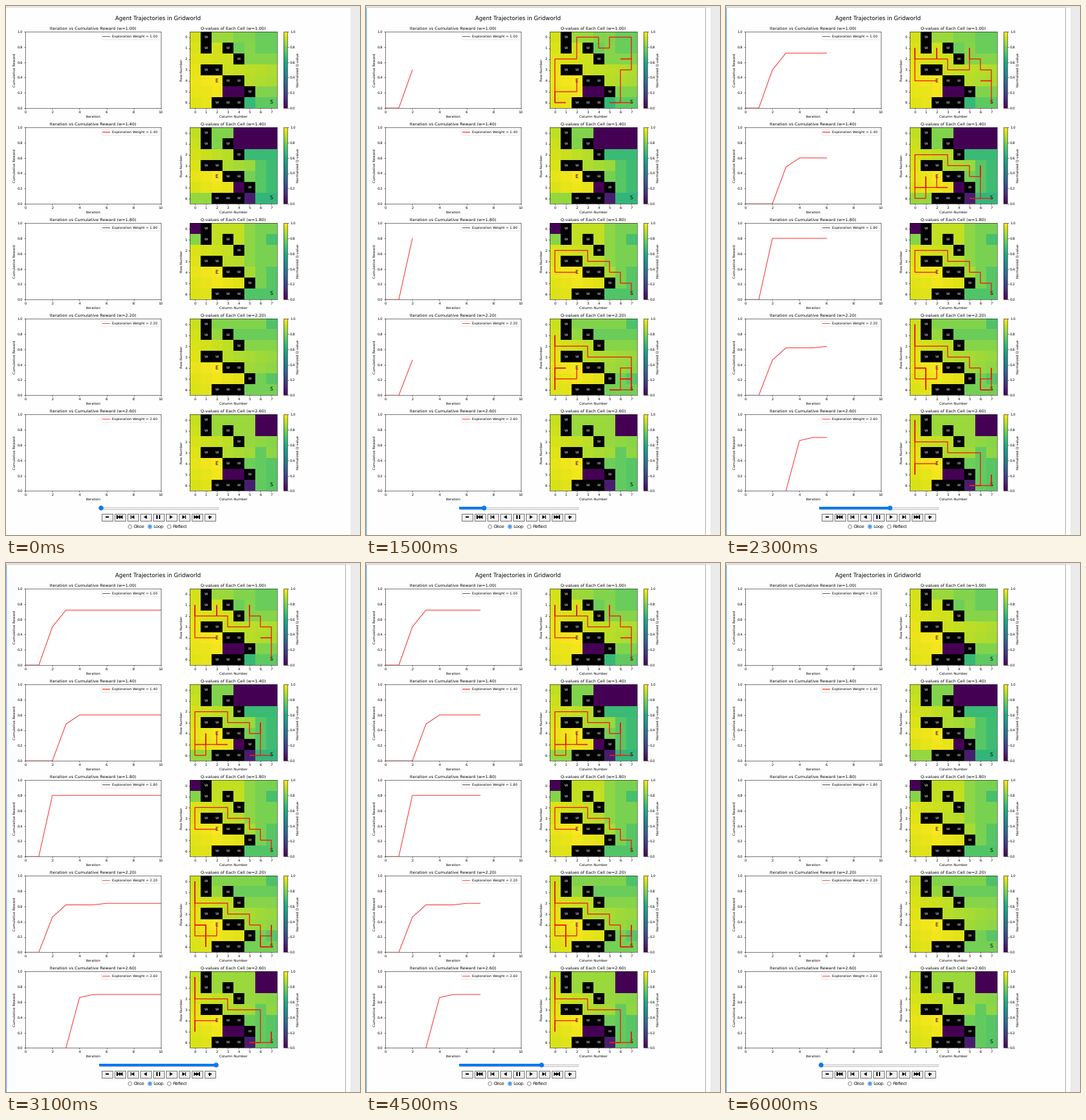
Animation, 551 px wide and 824 px high, one loop 7.5 s. Source, as a matplotlib script:

```python
import numpy as np
import matplotlib.pyplot as plt
from matplotlib.animation import FuncAnimation
from matplotlib.patches import Circle, Polygon, Rectangle

W, H, DPI = 551, 824, 64
PX = 72 / DPI              # points per pixel
U = 0.54 * PX              # shrinks matplotlib's default sizes to the page zoom
STEP_MS, LOOP_MS = 100, 7500
PAPER, RED, TRAIL_RED, BLUE = "#fefefe", "#fa1414", "#ee1c10", "#0b79f0"

plt.rcParams["font.family"] = "DejaVu Sans"
plt.rcParams["text.hinting"] = "none"
for key in ("font.size", "axes.titlepad", "axes.labelpad", "patch.linewidth",
            *(f"{a}tick.major.{k}" for a in "xy" for k in ("size", "pad"))):
    plt.rcParams[key] *= U
for key in ("axes.linewidth", "xtick.major.width", "ytick.major.width"):
    plt.rcParams[key] = 0.6

ROWS, COLS = 7, 8
EXIT, START = (4, 2), (6, 7)
WALLS = [(0, 1), (1, 1), (1, 3), (2, 4), (3, 1), (3, 2),
         (4, 3), (4, 4), (5, 5), (6, 2), (6, 3), (6, 4)]
MOVES = {"U": (0, -1), "D": (0, 1), "L": (-1, 0), "R": (1, 0)}

PLOT_X, PLOT_W = 30, 211
HEAT_X, HEAT_W = 285.5, 136
BAR_X, BAR_W = 432.4, 5.95
TOP, PITCH, BOX_H = 40, 149.1, 119


def panel(weight, legend, decay, patches, rewards, walks):
    return dict(weight=weight, legend=legend, decay=decay, patches=patches,
                rewards=rewards + rewards[-1:] * (11 - len(rewards)), walks=walks)


at = np.s_
PANELS = [
    panel(1.0, "#6b5858", 0.009,
          [(at[0, 2:5], .85), (at[0, 4:6], .81), (at[0:2, 6:], .77), (at[1, 4], .78),
           (at[1, 5], .82), (at[2, 5:], .82), (at[5, 6:], .81), (at[5, 3:5], 0),
           (at[6, 5], .67), (at[6, 6:], .75)],
          [0, 0, .5, .72],
          {2: "LLRUUURULRUULLDLULLDDLLDDDDRLURRU", 3: "UULRULULUDDLLULUDLLUDDDRR"}),
    panel(1.4, "#f01800", 0.014,
          [(at[0:2, 2:4], .81), (at[0:2, 4:], 0), (at[2, 5:], .68), (at[3:6, 6], .74),
           (at[3:6, 7], .69), (at[4, 5], .79), (at[5, 4], 0), (at[6, 0:2], .84),
           (at[6, 5], .08), (at[6, 6:], .66)],
          [0, 0, 0, .48, .6],
          {3: "LLRUUUDLULLULLLDDDDRUUDLRRRLU"}),
    panel(1.8, "#5c4a58", 0.011,
          [(at[0, 0], 0), (at[1, 0], .82), (at[0:2, 2:5], .91), (at[0:4, 5], .83),
           (at[0:4, 6:], .80), (at[1, 7], .71), (at[4:6, 6], .80), (at[4:6, 7], .74),
           (at[6, 5:], .73)],
          [0, 0, .8],
          {2: "ULULULLULLLDDRR"}),
    panel(2.2, "#ff5050", 0.012,
          [(at[0, 2:7], .81), (at[0, 7], .72), (at[1, 2], .84), (at[1, 4:], .77),
           (at[2, 5:], .82), (at[5, 6], .79), (at[5, 7], .74), (at[6, 5:], .79)],
          [0, 0, .46, .62, .62, .62, .64],
          {2: "LLRURDULURDUULLLLULLLUDDDDDUURLDRRU",
           3: "UUDLDRLUULULLULLLUUDDDDRDDUULDRRU"}),
    panel(2.6, "#ff4444", 0.013,
          [(at[0:2, 2:6], .85), (at[0:2, 6:], 0), (at[3:, 6], .76), (at[4:, 7], .74),
           (at[4, 5], .78), (at[5, 3:5], 0), (at[6, 5], .08)],
          [0, 0, 0, 0, .66, .7],
          {4: "UDLLRUUULLLULLLUUDDDDDURR"}),
]


def exit_distance():
    """Steps from every free cell to the exit."""
    dist, queue = {EXIT: 0}, [EXIT]
    for r, c in queue:
        for dc, dr in MOVES.values():
            cell = r + dr, c + dc
            inside = 0 <= cell[0] < ROWS and 0 <= cell[1] < COLS
            if inside and cell not in WALLS and cell not in dist:
                dist[cell] = dist[r, c] + 1
                queue.append(cell)
    return dist


def q_values(p):
    q = np.zeros((ROWS, COLS))
    for cell, steps in exit_distance().items():
        q[cell] = 0.99 - p["decay"] * steps
    for where, value in p["patches"]:
        q[where] = value
    for wall in WALLS:
        q[wall] = np.nan
    return np.ma.masked_invalid(q)


def row_top(i):
    return TOP + PITCH * i


def axes_at(x, y, w, h):
    return fig.add_axes([x / W, 1 - (y + h) / H, w / W, h / H])


def pixel_stage():
    ax = fig.add_axes([0, 0, 1, 1])
    ax.set(xlim=(0, W), ylim=(H, 0))
    ax.axis("off")
    return ax


def draw_panel(i, p):
    y, label = row_top(i), f"(w={p['weight']:.2f})"

    plot = axes_at(PLOT_X, y, PLOT_W, BOX_H)
    plot.plot([], [], color=p["legend"], lw=2 * U,
              label=f"Exploration Weight = {p['weight']:.2f}")
    plot.set(xlim=(0, 10), ylim=(0, 1), xticks=range(0, 11, 2),
             xlabel="Iteration", ylabel="Cumulative Reward",
             title=f"Iteration vs Cumulative Reward {label}")
    plot.legend(loc="upper right")

    heat = axes_at(HEAT_X, y, HEAT_W, BOX_H)
    cmap = plt.get_cmap("viridis").with_extremes(bad="black")
    image = heat.imshow(q_values(p), cmap=cmap, vmin=0, vmax=1, aspect="auto")
    heat.set(xticks=range(COLS), yticks=range(ROWS), xlabel="Column Number",
             ylabel="Row Number", title=f"Q-values of Each Cell {label}")
    middle = dict(ha="center", va="center")
    for r, c in WALLS:
        heat.text(c, r, "W", color="white", **middle)
    for (r, c), mark in ((EXIT, "E"), (START, "S")):
        heat.text(c, r, mark, color="black", size=14 * U, **middle)

    fig.colorbar(image, cax=axes_at(BAR_X, y, BAR_W, BOX_H), label="Normalized Q-value")


def draw_buttons(ax):
    def bar(x, y, w, h):
        ax.add_patch(Rectangle((x - w / 2, y - h / 2), w, h, fc="black", lw=0))

    def arrow(x, y, side):
        ax.add_patch(Polygon([(x + side * 2.6, y), (x - side * 2.2, y - 3),
                              (x - side * 2.2, y + 3)], fc="black", lw=0))

    y = 796
    for k in range(9):
        ax.add_patch(Rectangle((148.5 + 20 * k, 790.5), 17, 11, fc="#efefef",
                               ec="#666666", lw=0.9 * PX))
    bar(157, y, 5, 1.3)
    bar(317, y, 5, 1.3)
    bar(317, y, 1.3, 5)
    for side in (-1, 1):
        fast, step, play = (237 + side * d for d in (60, 40, 20))
        bar(fast + side * 4, y, 1.3, 6)
        arrow(fast + side * 1.2, y, side)
        arrow(fast - side * 2.4, y, side)
        bar(step + side * 2.8, y, 1.3, 6)
        arrow(step - side * 0.4, y, side)
        arrow(play, y, side)
        bar(237 + side * 1.8, y, 2, 6)


def draw_page(ax):
    ax.add_patch(Rectangle((0, 0), W, 2.5, fc="#e6e6e6", lw=0))
    ax.add_patch(Rectangle((536, 2), 15, H, fc="#ebebeb", lw=0))
    ax.text(237, 20, "Agent Trajectories in Gridworld", size=16 * U,
            ha="center", va="center")
    ax.add_patch(Rectangle((145.5, 780.5), 184, 3, fc="#efefef",
                           ec="#b8b8b8", lw=0.8 * PX))
    draw_buttons(ax)
    for x, name in ((193, "Once"), (224, "Loop"), (254, "Reflect")):
        chosen = name == "Loop"
        ax.add_patch(Circle((x, 811), 2.9, fc="white", lw=0.8 * PX,
                            ec=BLUE if chosen else "#767676"))
        if chosen:
            ax.add_patch(Circle((x, 811), 1.7, fc=BLUE, lw=0))
        ax.text(x + 5.3, 813.4, name, size=7.1 * PX, family="Liberation Sans")


def walk_points(i, moves):
    col, row = START[::-1]
    cells = [(col, row)]
    for move in moves:
        dc, dr = MOVES[move]
        col, row = col + dc, row + dr
        cells.append((col, row))
    x, y = np.array(cells).T + 0.5
    return HEAT_X + x * HEAT_W / COLS, row_top(i) + y * BOX_H / ROWS


fig = plt.figure(figsize=(W / DPI, H / DPI), dpi=DPI, facecolor=PAPER)

# The unchanging page is rendered once and reused as a backdrop.
draw_page(pixel_stage())
for i, p in enumerate(PANELS):
    draw_panel(i, p)
fig.canvas.draw()
backdrop = np.asarray(fig.canvas.buffer_rgba()).copy()
fig.clear()

stage = pixel_stage()
stage.imshow(backdrop, extent=(0, W, H, 0), aspect="auto", interpolation="nearest")
curves, trails = [], []
for i in range(len(PANELS)):
    curve, = stage.plot([], [], color=RED, lw=0.9 * PX)
    curve.set_clip_path(Rectangle((PLOT_X, row_top(i)), PLOT_W, BOX_H,
                                  transform=stage.transData))
    trail, = stage.plot([], [], color=TRAIL_RED, lw=1.35 * PX, snap=False,
                        solid_joinstyle="miter")
    curves.append(curve)
    trails.append(trail)
fill = stage.add_patch(Rectangle((145, 780.3), 0, 3.4, fc=BLUE, lw=0))
knob = stage.add_patch(Circle((148, 782), 3.7, fc=BLUE, lw=0))
selection = [stage.add_patch(Rectangle(xy, w, h, fc=color, lw=0))
             for xy, w, h, color in (((0, 2), 1.2, H, "#3fa9f0"),
                                     ((528, 2), 1, H, "#a6a6a6"),
                                     ((0, 2), 529, 1, "#d0d0d0"))]
stage.set(xlim=(0, W), ylim=(H, 0))

# Start times of the iterations 0..10, played twice and then rewound.
STARTS = [0, 1400, *range(1500, 3101, 200), 3200, 3300, *range(3500, 5101, 200), 5300]


def update(frame):
    t = frame * STEP_MS
    iteration = (int(np.searchsorted(STARTS, t, side="right")) - 1) % 11
    xs = np.arange(iteration + 1)
    for i, p in enumerate(PANELS):
        rewards = np.array(p["rewards"][:iteration + 1])
        curves[i].set_data(PLOT_X + xs * PLOT_W / 10, row_top(i) + BOX_H * (1 - rewards))
        known = [k for k in p["walks"] if k <= iteration]
        trails[i].set_data(*(walk_points(i, p["walks"][max(known)]) if known else ([], [])))
    x = 148 + 17.9 * iteration
    knob.center = x, 782
    fill.set_width(x - 145)
    for part in selection:
        part.set_visible(t >= 1200)
    return [*curves, *trails, fill, knob, *selection]


anim = FuncAnimation(fig, update, frames=LOOP_MS // STEP_MS, interval=STEP_MS,
                     repeat=True, repeat_delay=0)
plt.show()
```
